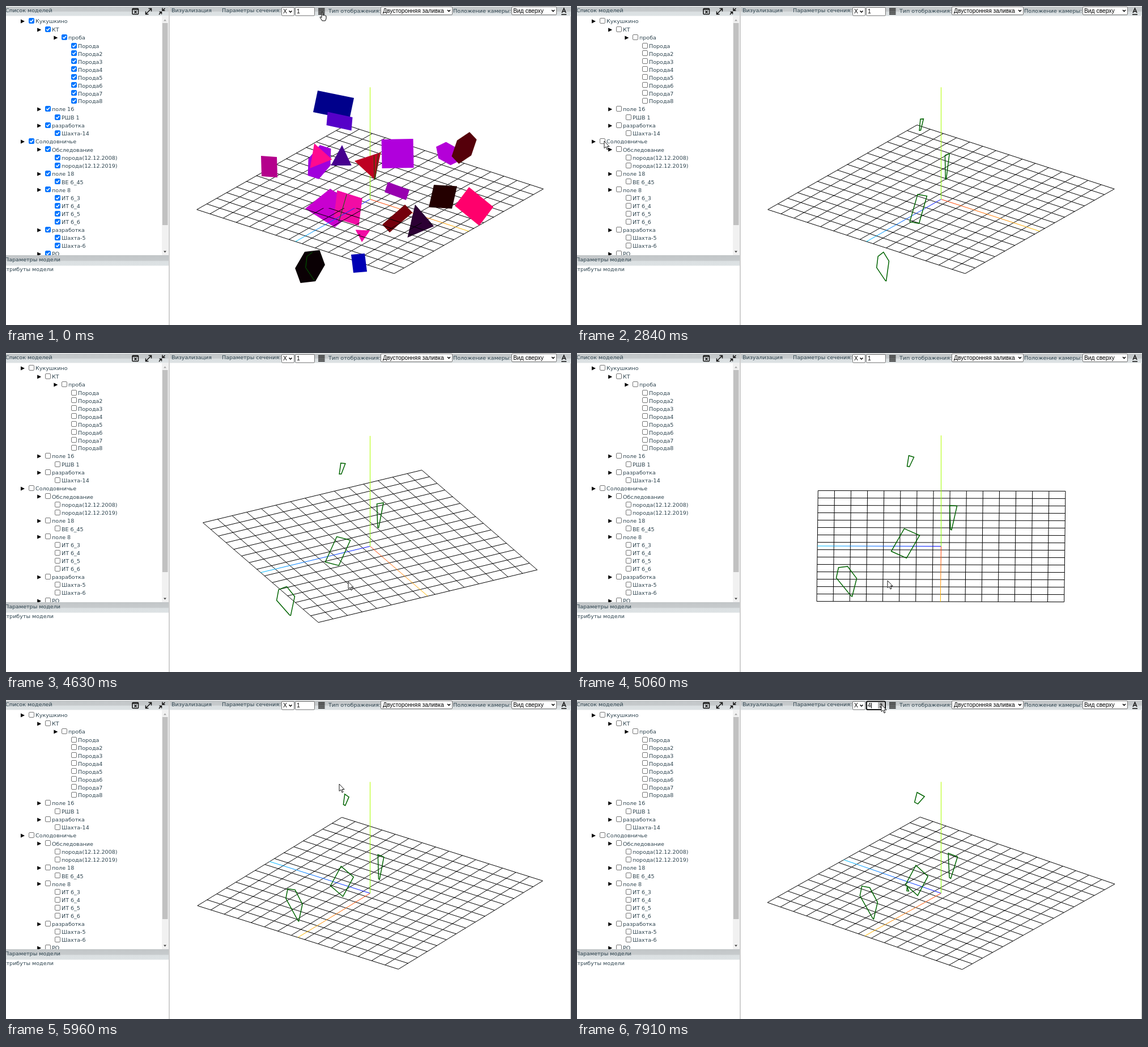
Write an HTML page with a canvas that moves like this. It is 997 px wide and 562 px high and loops after 8 s.

```html
<!DOCTYPE html>
<html lang="ru">
<head>
<meta charset="utf-8">
<style>
html, body { margin: 0; width: 100%; height: 100%; overflow: hidden; background: #fff; }
canvas, svg { position: absolute; left: 0; top: 0; }
text { font: 9.55px "DejaVu Sans", Verdana, sans-serif; fill: #2f4550; white-space: pre; }
.field text { font: 10.3px "Liberation Sans", Arial, sans-serif; fill: #000; }
.field rect { fill: #fff; stroke: #767676; rx: 1.5px; }
.bar { fill: url(#bar); }
.chev { fill: none; stroke: #000; stroke-width: 1.5; }
.icon { fill: none; stroke: #111; stroke-width: 1.5; }
.box rect { fill: #fff; stroke: #767676; }
.tick { display: none; }
.box.on rect { fill: #0075ff; stroke: #0075ff; }
.box.on .tick { display: inline; fill: none; stroke: #fff; stroke-width: 1.6; }
#focus { fill: none; stroke: #101010; stroke-width: 2; }
</style>
</head>
<body>
<canvas id="scene" width="997" height="562"></canvas>
<svg width="997" height="562" viewBox="0 0 997 562">
  <defs>
    <linearGradient id="bar" x2="0" y2="1">
      <stop offset="0" stop-color="#c2c6c8"/><stop offset=".5" stop-color="#c6cacc"/>
      <stop offset=".58" stop-color="#dbe0e2"/><stop offset="1" stop-color="#dde2e4"/>
    </linearGradient>
  </defs>
  <g id="tree"></g>
  <rect x="275" y="18" width="12" height="421" fill="#f1f1f1"/>
  <rect x="276" y="30" width="9.500" height="356" fill="#c1c1c1"/>
  <path d="M278 26.500l2.500-3l2.500 3z" fill="#a3a3a3"/>
  <path d="M278 431.500l2.500 3l2.500-3z" fill="#404040"/>
  <rect class="bar" y="1" width="287" height="16.500"/>
  <rect class="bar" x="289" y="1" width="708" height="16.500"/>
  <rect class="bar" y="439" width="287" height="18.500"/>
  <path d="M288 0V562M996.500 18V562" stroke="#c0c0c0" stroke-width="1.500"/>
  <text x="-1" y="11">Список моделей</text>
  <text x="-2" y="450">Параметры модели</text>
  <text x="-6" y="467">Атрибуты модели</text>
  <text x="292" y="11">Визуализация</text>
  <text x="381" y="11">Параметры сечения:</text>
  <text x="569" y="12">Тип отображения:</text>
  <text x="789" y="12">Положение камеры:</text>
  <g class="icon">
    <rect x="223" y="4.500" width="10.500" height="10" rx="1"/><path d="M223 6h10M226.500 8.500l4 4m0-4l-4 4"/>
    <path d="M247 14l9-9m-4.500-.5h5v5m-10 0v5h5"/>
    <path d="M270 15l4-4.500m2-2l4.500-4.500m-10 6.500h4v4m1.500-11v4.500h4.500"/>
    <path d="M551 4.500h11.500M551 7h11.500M551 9.500h11.500M551 12h11.500M551 14.500h11.500"/>
    <path d="M981 12l3.500-8l3.500 8m-6-2.500h5M980 15h9"/>
  </g>
  <g class="field">
    <rect x="486.500" y="2.500" width="22" height="14.500"/><text x="489" y="13">X</text>
    <rect x="510.500" y="2.500" width="34" height="14.500"/><text id="num" x="513" y="13">1</text>
    <rect x="661.500" y="1.500" width="126" height="14"/><text x="665" y="12">Двусторонняя заливка</text>
    <rect x="892.500" y="1.500" width="79" height="14"/><text x="895" y="12">Вид сверху</text>
  </g>
  <path class="chev" d="M499.500 8.500l2.500 2.500l2.500-2.500M779 7l2.500 2.500l2.500-2.500M963 7l2.500 2.500l2.500-2.500"/>
  <g id="spin">
    <rect id="press" x="531" y="4" width="11" height="11" fill="#b8b8b8"/>
    <path d="M533.500 8.500l3-3.500l3 3.500zM533.500 11l3 3.500l3-3.500z" fill="#505050"/>
  </g>
  <g id="active"><rect id="focus" x="511" y="2.500" width="33" height="14.500" rx="2"/><path d="M519.500 5v9.500" stroke="#000"/></g>
  <g id="cursor" fill="#fff" stroke="#000" stroke-linejoin="round">
    <path id="arrow" d="M0 0V12.500L3 10L5 15L7 14L5 9.500H9Z" stroke-width=".9"/>
    <path id="hand" d="M-1 0q1.500-1 2 1v4.500q1.500-1 2 .3q1.500-1 2 .4q1.500-.8 2 .6V11L5.500 15H0L-4 9q0-2 3 .5Z"/>
  </g>
</svg>
<script>
const $ = id => document.getElementById(id);
const ctx = $('scene').getContext('2d');
const LOOP = 8000, OFF_A = 1390, OFF_B = 2690;

// One dot per level; a dash marks a leaf
const outline = `Кукушкино|.КТ|..проба|${['', 2, 3, 4, 5, 6, 7, 8].map(n => '..-Порода' + n).join('|')}|` +
  '.поле 16|.-РШВ 1|.разработка|.-Шахта-14|' +
  'Солодовничье|.Обследование|.-порода(12.12.2008)|.-порода(12.12.2019)|.поле 18|.-ВЕ 6_45|' +
  '.поле 8|.-ИТ 6_3|.-ИТ 6_4|.-ИТ 6_5|.-ИТ 6_6|.разработка|.-Шахта-5|.-Шахта-6|.РО';

function buildTree() {
  let y = 27, group = 'a';
  $('tree').innerHTML = outline.split('|').map(row => {
    const [, dots, leaf, label] = row.match(/^(\.*)(-?)(.*)$/);
    const x = 40 + dots.length * 29.2 + (leaf ? 17 : 0), top = Math.round(y - 6);
    if (label === 'Солодовничье') group = 'b';
    const html = (leaf ? '' : `<path d="M${x - 14} ${top + 2.5}l7 3.500l-7 3.500z"/>`) +
      `<g class="box ${group}" transform="translate(${Math.round(x)} ${top})">` +
      '<rect x=".5" y=".5" width="9" height="9" rx="1.500"/><path class="tick" d="M2.300 5l2 2l3.800-4.200"/></g>' +
      `<text x="${Math.round(x + 12)}" y="${Math.round(y + 3.3)}">${label}</text>`;
    y += leaf ? 13.95 : 14.5;
    return html;
  }).join('');
}
buildTree();
const boxes = [...document.querySelectorAll('.box')];

// A solid's silhouette is a regular polygon spanned by two vectors u and v
function solid(color, sides, cx, cy, ux, uy, vx, vy) {
  const path = new Path2D();
  for (let k = 0; k < sides; k++) {
    const a = k * 2 * Math.PI / sides, c = Math.cos(a), s = Math.sin(a);
    path.lineTo(cx + ux * c + vx * s, cy + uy * c + vy * s);
  }
  return { color, path, cy, sunk: cy > 355 && cy < 410 };
}
const groupA = [
  solid('#b4008c', 4, 464.5, 283, -14.5, -19, 13.5, -17),
  solid('#a000dc', 6, 553, 275, 1, -30, 23, -10),
  solid('#ff0a8f', 3, 552, 266, -8, -24, 22.5, -9),
  solid('#46008f', 3, 592, 269, 1, -24, 21, 0),
  solid('#b000dc', 4, 691, 260, -28.5, -25, 27.5, -26),
  solid('#b400d8', 6, 780.5, 260, -4, -20.5, 22.5, 2),
  solid('#9800b0', 4, 690, 326, -16, -16, 22, -2),
  solid('#c800d0', 4, 576, 356, -4, -34, 48, -1),
  solid('#f20ca4', 4, 603.5, 356, -19, -31, 25, -17),
  solid('#f20ca4', 3, 629, 402, -1, 14, 14.5, .5)
];
const groupB = [
  solid('#00008b', 4, 578, 174.5, -28, -25.5, 36, -12.5),
  solid('#5500c8', 4, 588.5, 203, -21, -16.5, 23, -7),
  solid('#be0022', 3, 642.5, 279, -27.5, -6, 6, -28),
  solid('#55000a', 6, 808.5, 250, 9.5, -28, 20, -1),
  solid('#240000', 4, 771, 336, -16, -21, 25, -18.5),
  solid('#ff006c', 4, 826, 353, -9, -34, 34, 1),
  solid('#74000c', 4, 690.5, 374.5, 13.5, -24.5, 26.5, -10.5),
  solid('#2c0034', 3, 728.5, 382, -6.5, -32, 27, -11.5),
  solid('#0a0004', 6, 536.5, 459, -9.5, -26, 25, -18.5),
  solid('#0000b4', 4, 623, 453, -14, -15, 10, -17)
];

// Cuts through the solids as z,y points; the first `seen` also show on the solid.
// Each widens by `grow` around `mid` while the plane moves from the first to the fourth place.
const cuts = [
  { off: OFF_B, seen: 0, mid: 53, grow: .85, pts: [[57, 177], [48, 174], [56, 155], [60, 156]] },
  { off: OFF_B, seen: 4, mid: -24, grow: .6, pts: [[-28, 78], [-18.5, 31], [-16.5, 32], [-15, 79]] },
  { off: OFF_A, seen: 2, mid: 63, grow: 0, pts: [[88, -11.4], [65, 33.3], [38, 19.9], [61, -24.8]] },
  { off: OFF_B, seen: 4, mid: 150, grow: .1, pts: [[165, -41.5], [181, -43.8], [185, -64], [159, -99.6], [157, -100.7], [149, -65]] },
  { from: 4, mid: 84, grow: 0, pts: [[84.7, -15], [81, -22], [85.3, -23]] }
];

// The picture advances in beats of about 140 ms between these marks
const marks = [0, 280, 1390, 1820, 2840, 3240, 4210, 5060, 5960, 6680, 7910];
const steps = marks.flatMap((a, i) => {
  const gap = (marks[i + 1] ?? LOOP) - a, n = Math.max(1, a ? Math.round(gap / 140) : 1);
  return Array.from({ length: n }, (_, k) => a + gap * k / n);
});

// time, turn in degrees, sine of the elevation
const view = [[3900, 37.1, .428], [4210, 48.15, .459], [5060, 90.3, .447], [5960, 125.7, .439], [6680, 127.7, .438], [7910, 128.1, .438]];
// time, x, y
const pointer = [[0, 558, 11], [280, 530, 22], [1240, 44, 26], [1820, 44, 28], [2700, 48, 238], [3240, 48, 238],
  [3800, 654, 398], [4210, 632, 404], [5060, 548, 401], [5700, 480, 396], [5960, 588, 148], [6380, 545, 9], [6900, 537, 8]];

function sample(keys, t) {
  const i = keys.findIndex(k => k[0] > t);
  if (i < 0) return keys.at(-1).slice(1);
  if (!i) return keys[0].slice(1);
  const a = keys[i - 1], b = keys[i], f = (t - a[0]) / (b[0] - a[0]);
  return a.slice(1).map((v, j) => v + (b[j + 1] - v) * f);
}

function drawScene(t, value) {
  const R = 218.3, [deg, s] = sample(view, t);
  const c = Math.sqrt(1 - s * s), cos = Math.cos(deg * Math.PI / 180), sin = Math.sin(deg * Math.PI / 180);
  const project = (x, y, z) => [642.5 + x * cos - z * sin, 340.5 + s * (x * sin + z * cos) - c * y];
  const trace = (pts, close) => {
    ctx.beginPath();
    pts.forEach(p => ctx.lineTo(...p));
    if (close) ctx.closePath();
    ctx.stroke();
  };
  const solids = [...(t < OFF_A ? groupA : []), ...(t < OFF_B ? groupB : [])];
  const fill = o => { ctx.fillStyle = o.color; ctx.fill(o.path); };

  ctx.clearRect(0, 0, 997, 562);
  solids.filter(o => o.sunk).forEach(fill);

  ctx.lineWidth = 1;
  ctx.strokeStyle = '#000';
  for (let i = 0; i <= 15; i++) {
    const k = R * (i / 7.5 - 1);
    trace([project(k, 0, -R), project(k, 0, R)]);
    trace([project(-R, 0, k), project(R, 0, k)]);
  }
  const axis = (end, from, to) => {
    const a = project(0, 0, 0), b = project(...end);
    const g = ctx.createLinearGradient(...a, ...b);
    g.addColorStop(0, from);
    g.addColorStop(1, to);
    ctx.strokeStyle = g;
    trace([a, b]);
  };
  axis([R, 0, 0], '#ff3000', '#ffc000');
  axis([0, 0, R], '#0000ff', '#00c0ff');
  axis([0, R, 0], '#80ff00', '#b8ff00');

  // The lower half of a sunk solid stays under the grid
  for (const o of solids) {
    ctx.save();
    ctx.beginPath();
    ctx.rect(0, 0, 997, o.sunk ? o.cy : 562);
    ctx.clip();
    fill(o);
    ctx.restore();
  }

  const f = (value - 1) / 3;
  ctx.strokeStyle = '#006400';
  for (const { off = 0, from = 1, seen, mid, grow, pts } of cuts) {
    if (value < from) continue;
    const line = pts.map(([z, y]) => project(-2.7 * value, y - 2.2 * f, mid + (z - mid) * (1 + grow * f) + 2 * f * Math.sign(grow)));
    const whole = t >= off;
    ctx.lineWidth = whole ? 1.5 : 1;
    trace(whole ? line : line.slice(0, seen), whole);
  }
}

function show(id, on) { $(id).style.display = on ? '' : 'none'; }

function render(t) {
  const value = 1 + Math.max(0, Math.floor((t - 6730) / 340));
  drawScene(t, value);
  boxes.forEach(b => b.classList.toggle('on', t < (b.classList.contains('a') ? OFF_A : OFF_B)));
  $('num').textContent = value;
  show('spin', t >= 6380);
  show('press', value > 1);
  show('active', value > 1);
  show('hand', t < 280);
  show('arrow', t >= 280);
  $('cursor').setAttribute('transform', `translate(${sample(pointer, t).join(' ')})`);
}

let last = -1;
function frame() {
  const now = performance.now() % LOOP;
  const t = steps.findLast(s => s <= now);
  if (t !== last) render(last = t);
  requestAnimationFrame(frame);
}
frame();
</script>
</body>
</html>
```
